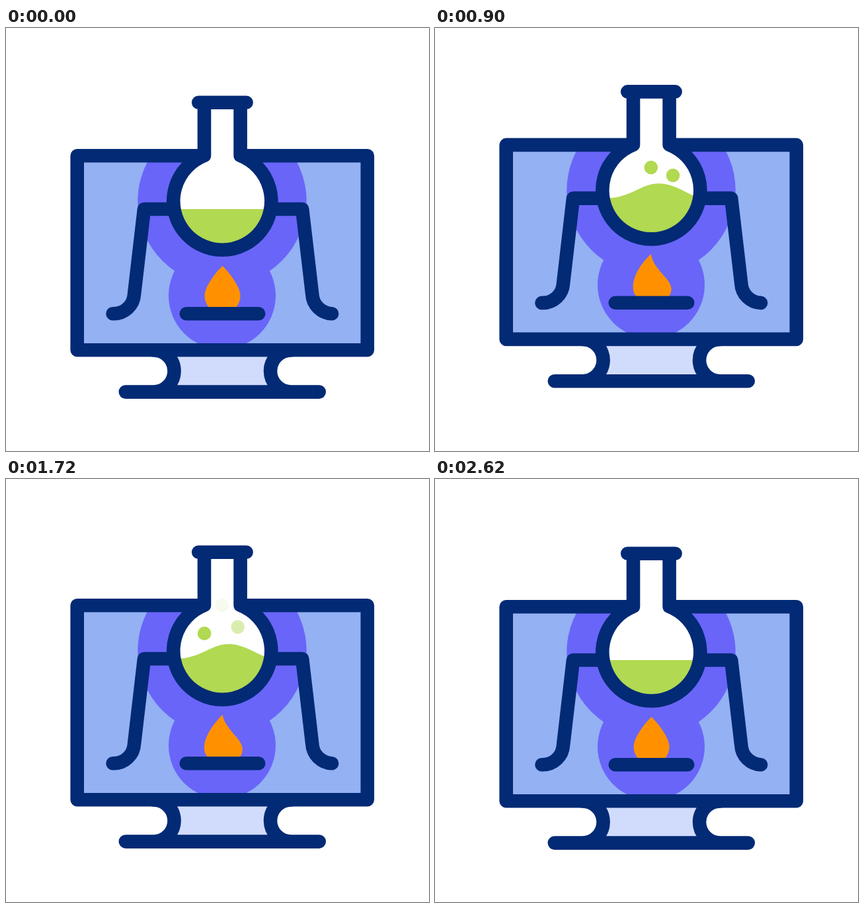
An HTML page for the animation above (2820 ms loop, 640 by 640 pixels).

```html
<!DOCTYPE html>
<html lang="en">
<head>
<meta charset="utf-8">
<title>Online chemistry lab</title>
<style>
  html, body { margin: 0; width: 100%; height: 100%; overflow: hidden; background: #fff; }
  svg { display: block; width: 100%; height: 100%; }
  .line { fill: none; stroke: #032a75; stroke-width: 20.6; stroke-linecap: round; stroke-linejoin: round; }
  .green { fill: #b1d951; }
</style>
</head>
<body>
<svg viewBox="0 0 640 640">
  <defs>
    <clipPath id="screen"><rect x="107.7" y="193.3" width="439.1" height="294"/></clipPath>
    <clipPath id="bulb"><circle cx="327.3" cy="261.8" r="68"/></clipPath>
  </defs>

  <g id="scene">
    <!-- Foot -->
    <path fill="#d1dcfc" d="M223 487.4 A31.6 31.6 0 0 1 223 550.6 H431.6 A31.6 31.6 0 0 1 431.6 487.4 Z"/>
    <path class="line" d="M223 487.4 A31.6 31.6 0 0 1 223 550.6 M431.6 487.4 A31.6 31.6 0 0 0 431.6 550.6 M180.8 550.6 H473.8"/>

    <!-- Screen -->
    <g clip-path="url(#screen)">
      <rect x="107.7" y="193.3" width="439.1" height="294" fill="#93b1f3"/>
      <g fill="#6965f9">
        <circle cx="327" cy="262" r="127.7"/>
        <circle cx="327" cy="405" r="81"/>
      </g>
    </g>
    <rect class="line" x="107.7" y="193.3" width="439.1" height="294"/>

    <!-- Burner and stand -->
    <path id="flame" fill="#ff9100"/>
    <path class="line" d="M272.8 432.2 H382.2"/>
    <path class="line" d="M254 274 H209 L194 403 A31 31 0 0 1 163 432.3 H161.5 M400.6 274 H448.2 L463.3 403 A31 31 0 0 0 493.1 432.3"/>

    <!-- Flask -->
    <path fill="#fff" d="M300 112.8 V193 A74 74 0 1 0 354.6 193 V112.8 Z"/>
    <g id="bubbles"></g>
    <g clip-path="url(#bulb)"><path id="wave" class="green"/></g>
    <path class="line" d="M300 112.8 V193 A74 74 0 1 0 354.6 193 V112.8 M291.2 112.8 H363.6"/>
  </g>
</svg>

<script>
  const LOOP = 2820, START = 200, END = 2600;
  const BOB = 19.3, AXIS = 330.2, RISE = 300, DEPTH = 42;
  const $ = id => document.getElementById(id);

  const progress = (t, from, to) => Math.min(1, Math.max(0, (t - from) / (to - from)));
  const smooth = (t, from, to) => {
    const p = progress(t, from, to);
    return p * p * (3 - 2 * p);
  };
  const mix = (a, b, k) => a + (b - a) * k;
  const mixPoints = (a, b, k) => a.map(([x, y], i) => [mix(x, b[i][0], k), mix(y, b[i][1], k)]);
  const mirror = points => points.map(([x, y]) => [2 * AXIS - x, y]).reverse();
  const curve = ([first, ...rest]) => `M${first}C${rest.join(' ')}`;

  // Fade in over one stretch, swing between 0 and 1, fade out
  function swing(t, fade, step) {
    const p = Math.max(0, Math.min(t, END - fade) - START - fade) / step;
    const turn = Math.floor(p), part = smooth(p - turn, 0, 1);
    return {
      strength: smooth(t, START, START + fade) - smooth(t, END - fade, END),
      side: turn % 2 ? 1 - part : part
    };
  }

  const flameRest = [
    [327.5, 360], [318, 369], [300.5, 391], [300.5, 405],
    [300.5, 420], [312.5, 432], [327.5, 432],
    [342.5, 432], [354.5, 420], [354.5, 405],
    [354.5, 391], [337, 369], [327.5, 360]
  ];
  const flameLean = [
    [335, 358.5], [334, 385], [303.5, 397], [303.5, 412],
    [303.5, 422], [312, 432], [331, 432],
    [348, 432], [361.5, 424], [361.5, 408],
    [361.5, 388], [349, 366], [335, 358.5]
  ];
  const waveLean = [
    [264, 272.5], [281, 262], [298, 251.7], [318.6, 251.7],
    [345, 251.7], [359, 274], [398, 274]
  ];
  const waveRest = waveLean.map((_, i) => [262 + 22 * i, 274]);

  function lean(rest, bent, { strength, side }) {
    return curve(mixPoints(rest, mixPoints(bent, mirror(bent), side), strength));
  }

  const bubbles = [
    { rise: 200, from: 200, to: 1800, fade: 800, x: 326.8, y: 251.4, dx: 0, dy: -58.8 },
    { rise: 200, from: 500, to: 2000, fade: 600, x: 362.3, y: 242.7, dx: -12.8, dy: -18.5 },
    { rise: 900, from: 1200, to: 2500, fade: 600, x: 293.4, y: 246.1, dx: 19, dy: -29.5 }
  ];
  for (const b of bubbles) {
    b.el = document.createElementNS('http://www.w3.org/2000/svg', 'circle');
    b.el.setAttribute('class', 'green');
    b.el.setAttribute('r', 10.3);
    $('bubbles').append(b.el);
  }

  function draw(now) {
    const t = now % LOOP;
    const bob = swing(t, 600, 600), tilt = swing(t, 200, 400);
    $('scene').setAttribute('transform', `translate(0 ${BOB * bob.strength * (2 * bob.side - 1)})`);
    $('flame').setAttribute('d', lean(flameRest, flameLean, tilt));
    $('wave').setAttribute('d', lean(waveRest, waveLean, tilt) + 'V340H262Z');
    for (const b of bubbles) {
      const drift = smooth(t, b.from, b.to);
      const sunk = DEPTH * (1 - smooth(t, b.rise, b.rise + RISE));
      b.el.setAttribute('cx', b.x + b.dx * drift);
      b.el.setAttribute('cy', b.y + b.dy * drift + sunk);
      b.el.setAttribute('opacity', 1 - progress(t, b.to - b.fade, b.to));
    }
    requestAnimationFrame(draw);
  }
  draw(performance.now());
</script>
</body>
</html>
```
